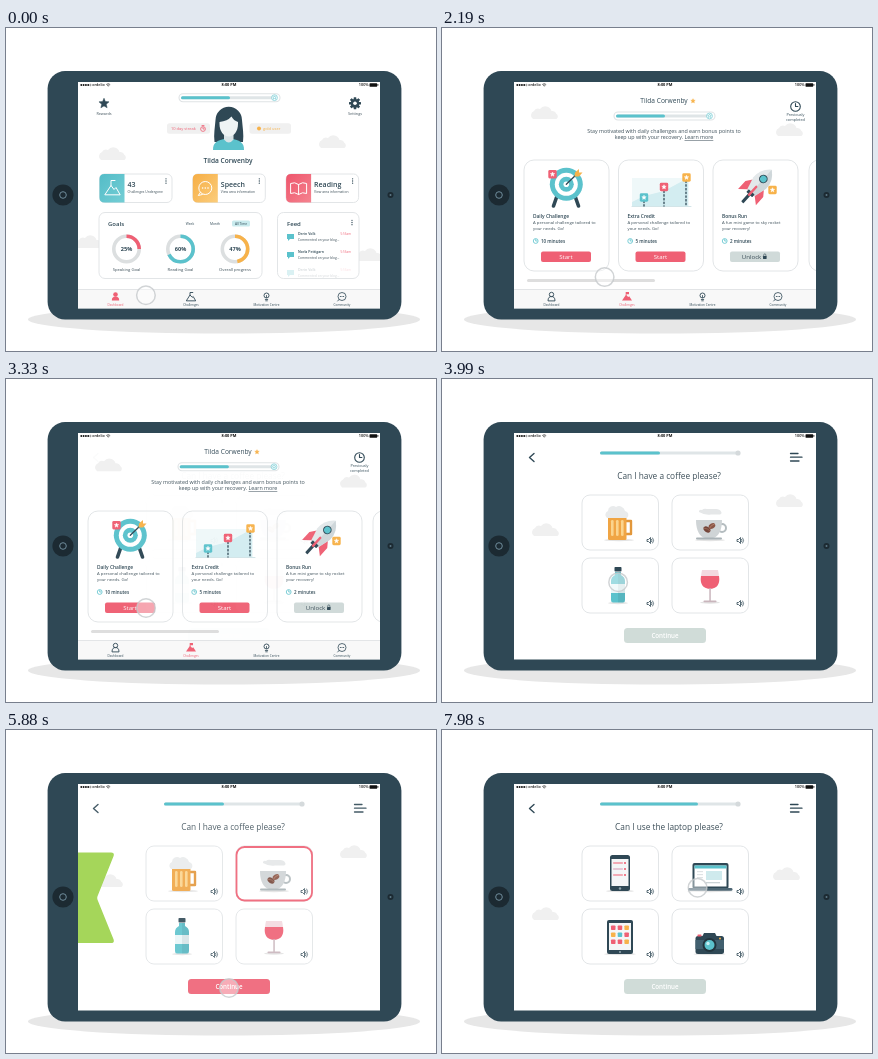
Write an HTML page that moves like this. It is 430x323 px and loops after 8000 ms.

```html
<!DOCTYPE html>
<html lang="en">
<head>
<meta charset="utf-8">
<title>Speech recovery app</title>
<style>
html, body { margin: 0; width: 100%; height: 100%; overflow: hidden; background: #fff; }
svg { display: block; width: 100vw; height: 100vh; }
text { font-family: "Open Sans", "Noto Sans", sans-serif; }
</style>
</head>
<body>
<svg id="stage" viewBox="0 0 430 323"></svg>
<script>
const NAVY = '#2f4855', TEAL = '#5bc2cc', RED = '#ef6074', GOLD = '#f7b24a',
      GREY = '#dfe3e5', PALE = '#f0f0f0', TEXT = '#3d4f59';
const LOOP = 8000;

// ---- shape helpers ----
const rect = (x, y, w, h, r, fill, more = '') =>
  `<rect x="${x}" y="${y}" width="${w}" height="${h}" rx="${r}" fill="${fill}" ${more}/>`;
const circle = (x, y, r, fill, more = '') =>
  `<circle cx="${x}" cy="${y}" r="${r}" fill="${fill}" ${more}/>`;
const oval = (x, y, rx, ry, fill) => `<ellipse cx="${x}" cy="${y}" rx="${rx}" ry="${ry}" fill="${fill}"/>`;
const path = (d, fill, more = '') => `<path d="${d}" fill="${fill}" ${more}/>`;
const line = (d, color, w = 1, more = '') =>
  path(d, 'none', `stroke="${color}" stroke-width="${w}" stroke-linecap="round" stroke-linejoin="round" ${more}`);
const ring = (x, y, r, color, w = 1) => circle(x, y, r, 'none', `stroke="${color}" stroke-width="${w}"`);
const group = (id, body, more = '') => `<g id="${id}" ${more}>${body}</g>`;
const at = (x, y, body, more = '') => `<g transform="translate(${x} ${y}) ${more}">${body}</g>`;
const gradient = (id, from, to) =>
  `<linearGradient id="${id}" x2="1" y2="1"><stop stop-color="${from}"/><stop offset="1" stop-color="${to}"/></linearGradient>`;

// Text is placed by its visual middle.
const text = (x, y, size, str, { fill = TEXT, weight = 400, anchor = 'start' } = {}) =>
  `<text x="${x}" y="${y + size * 0.35}" font-size="${size}" fill="${fill}" font-weight="${weight}" text-anchor="${anchor}">${str}</text>`;
const mid = (x, y, size, str, fill = TEXT, weight = 400) => text(x, y, size, str, { fill, weight, anchor: 'middle' });

const starPath = (x, y, r) => 'M' + Array.from({ length: 10 }, (_, i) => {
  const a = i * Math.PI / 5, q = i % 2 ? r * 0.45 : r;
  return `${(x + q * Math.sin(a)).toFixed(2)} ${(y - q * Math.cos(a)).toFixed(2)}`;
}).join('L') + 'Z';
const star = (x, y, r, fill) => path(starPath(x, y, r), fill, `stroke="${fill}" stroke-width=".5" stroke-linejoin="round"`);
const panel = (x, y, w, h, r) => rect(x, y, w, h, r, '#fff', `stroke="${GREY}" stroke-width=".9"`);
const badge = (x, y, color) => rect(x - 4.2, y - 4.2, 8.4, 8.4, 1.4, color) + star(x, y, 2.3, '#fff');
const clock = (x, y, r, color, w) => ring(x, y, r, color, w) + line(`M${x} ${y - r * .6}V${y}H${x + r * .5}`, color, w);
const dots = (x, y) => [-2.2, 0, 2.2].map(d => circle(x, y + d, .65, NAVY)).join('');
const bubble = (x, y, color) => path(`M${x - 3.5} ${y - 3}h7v5h-4l-2 2v-2h-1z`, color);
const cloudShape = path('M-13 6a4.5 4.5 0 0 1 1-8a5 5 0 0 1 6-2a6.5 6.5 0 0 1 11.5 2a5 5 0 0 1 5 3a3 3 0 0 1 0 5z', PALE);

// ---- tablet ----
const device =
  oval(218, 291.5, 196, 14, '#e7e7e7') +
  rect(41.6, 43.1, 353.8, 248.4, 17.5, NAVY) +
  circle(57, 167, 10.6, '#1c2a32') + ring(57, 167, 3.3, '#6f8c9b', 1) +
  circle(384.5, 167, 3, '#1c2a32') + circle(384.5, 167, 1, '#5d7886') +
  rect(72, 54, 302, 226.5, 0, '#fff');

const status =
  [0, 1, 2, 3].map(i => circle(75.3 + i * 2.3, 57, .95, '#111')).join('') + ring(84.4, 57, .75, '#111', .4) +
  text(86.3, 57, 3.7, 'ordelio', { fill: '#111', weight: 600 }) +
  line('M100.5 56.3q1.7-1.5 3.4 0M101.3 57.3q.9-.8 1.8 0', '#111', .6) + circle(102.2, 58.1, .4, '#111') +
  mid(223, 57, 3.9, '8:00 PM', '#111', 700) +
  text(362.6, 57, 3.8, '100%', { fill: '#111', weight: 600, anchor: 'end' }) +
  rect(363.5, 55.3, 7.7, 3.4, .6, '#111') + rect(371.5, 56.3, .8, 1.4, .2, '#111');

// ---- tab bar ----
const icons = [
  c => circle(0, -2, 2.3, c) + path('M-3.7 4c0-3 1.5-4 3.7-4s3.7 1 3.7 4z', c),
  c => path('M-5 4L-1-1.8L1.2 .5L2.2-.3L5 4z', c) + path('M-1.3-4.5H2V-2.3H-.5V-1h-.8z', c),
  c => ring(0, -1, 2.5, c, .9) + line('M-1.2 3h2.4M-.8 4.3h1.6M0 1v-2', c, .8),
  c => ring(0, 0, 4, c, .8) + line('M-3 3l-1.3 1.5', c, .8) + [-1.6, 0, 1.6].map(x => circle(x, 0, .6, c)).join('')
];
const outlines = [
  c => ring(0, -2, 2.2, c, .9) + line('M-3.5 4c0-3 1.5-4 3.5-4s3.5 1 3.5 4z', c, .9),
  c => line('M-4.5 4L-1-1.5L1.2 .8L2.2 0L4.5 4zM-1-1.5V-4H1.8', c, .9),
  icons[2], icons[3]
];
const tabs = ['Dashboard', 'Challenges', 'Motivation Centre', 'Community'];
const tabItem = (i, on) => {
  const x = 109.5 + i * 75.5, c = on ? RED : NAVY;
  return at(x, 268.5, (on ? icons : outlines)[i](c)) + mid(x, 276.6, 3.1, tabs[i], c);
};
const tabBar = active => rect(72, 261.5, 302, 19, 0, '#f8f8f8') + line('M72 261.5H374', '#dcdfe1', .8) +
  tabs.map((_, i) => tabItem(i, i === active)).join('');

// ---- dashboard ----
const gear = at(349, 75.3, Array.from({ length: 8 }, (_, i) =>
  rect(-1.3, -6, 2.6, 4, .5, NAVY, `transform="rotate(${i * 45})"`)).join('') + circle(0, 0, 4.4, NAVY) + circle(0, 0, 1.8, '#fff'));
const avatar =
  path('M208.5 114C207.5 106 209 99 209.500 92a13.200 13.200 0 0 1 26.500 0c.5 7 2 14 1 22z', NAVY) +
  path('M207 122c0-7 3-9 11-11h9c8 2 11 4 11 11z', TEAL) +
  path('M218 104h9.5v7.500q-4.700 6-9.500 0z', '#d9e3e6') +
  path('M213.5 94q8-1 12-5.500q2 4 6.500 5.500v2c0 7-4 12.500-9.200 12.500s-9.300-5.500-9.300-12.500z', '#eef3f4');
const tileArt = [
  line('M-7 6L-1-3L2 1L4-1L8 6zM-1-3V-8H3', '#fff', 1),
  circle(0, -.5, 6.5, 'none', 'stroke="#fff" stroke-width="1"') + line('M-5 4l-2 3l4-1', '#fff', 1) +
    [-2.7, 0, 2.7].map(x => circle(x, -.5, .8, '#fff')).join(''),
  line('M0-4q-4-3-8-1V5q4-2 8 1q4-3 8-1V-5q-4-2-8 1V6', '#fff', 1)
];
const tile = (i, tint, title, sub) => {
  const x = 93.5 + i * 93.3;
  return panel(x, 146, 72.5, 28.5, 5) +
    path(`M${x + 25} 146h-20q-5 0-5 5v18.5q0 5 5 5h20z`, `url(#${tint})`) +
    at(x + 12.5, 160.5, tileArt[i]) +
    text(x + 28, 156.5, 7, title, { fill: NAVY, weight: 600 }) +
    text(x + 28, 164, 3.35, sub) + dots(x + 66.5, 153);
};
const donut = (x, pct, arc, color, label) =>
  ring(x, 221, 12.7, '#dcdfe0', 3.6) +
  `<circle cx="${x}" cy="221" r="12.7" fill="none" stroke="${color}" stroke-width="3.6" pathLength="100" stroke-dasharray="${arc} 100" transform="rotate(-90 ${x} 221)"/>` +
  mid(x, 221.5, 5.6, pct + '%', NAVY, 700) + mid(x, 242, 4.2, label);
const post = (y, who, when) => bubble(284.5, y + 2, TEAL) +
  text(292, y - 1.5, 3.5, who, { fill: NAVY, weight: 600 }) +
  text(345, y - 1.5, 3, when, { fill: RED, anchor: 'end' }) + text(292, y + 5, 3.25, 'Commented on your blog...');

const home =
  at(328, 114, cloudShape) + at(85, 214, cloudShape) +
  star(98, 75.5, 5.3, NAVY) + mid(98, 86, 3.8, 'Rewards') + gear + mid(349, 86, 3.8, 'Settings') +
  avatar +
  rect(161, 95.2, 43, 10.5, 2.5, PALE) + text(165, 100.5, 4, '10 day streak', { fill: RED }) +
  clock(197, 101, 2.4, RED, .8) + line('M196 97.5h2', RED, .8) +
  rect(243.5, 95.2, 41.5, 10.5, 2.5, PALE) + circle(253, 100.5, 2, GOLD) + text(257, 100.5, 4, 'gold user', { fill: GOLD }) +
  tile(0, 'tealTint', '43', 'Challenges Undergone') +
  tile(1, 'goldTint', 'Speech', 'View area information') +
  tile(2, 'redTint', 'Reading', 'View area information') +
  panel(93, 184.5, 163, 66, 6) + text(102, 195.5, 6, 'Goals', { fill: NAVY, weight: 600 }) +
  mid(184, 195.5, 3.3, 'Week', NAVY) + mid(209, 195.5, 3.3, 'Month', NAVY) +
  rect(226, 192.5, 18, 6, 1.5, '#c9ebee') + mid(235, 195.5, 3.3, 'All Time', NAVY) +
  donut(120.5, 25, 25, RED, 'Speaking Goal') + donut(174.5, 60, 68, TEAL, 'Reading Goal') +
  donut(229, 47, 47, GOLD, 'Overall progress') +
  panel(271.5, 184.5, 81.5, 66, 6) + text(281, 195.5, 6, 'Feed', { fill: NAVY, weight: 600 }) + dots(346, 194.5) +
  post(207, 'Derin Volk', '5:56am') + post(225, 'Norla Pettigarn', '5:56am') +
  `<g opacity=".22">${post(243, 'Derin Volk', '5:56am')}</g>` +
  tabBar(0);

// ---- challenges ----
const target =
  line('M115 168l-3.500 10M133 168l3.500 10', NAVY, 3.6) +
  [[16.5, TEAL], [11.5, '#fff'], [7.5, TEAL], [2.8, '#fff']].map(([r, c]) => circle(124.3, 156.3, r, c)).join('') +
  line('M124.300 156.300L135 146', NAVY, 1.3) + path('M132.500 148.500l.5-4 4-3.500v3.500h3.500l-3.500 4z', GOLD) + badge(110.5, 146.3, RED);
const chart =
  rect(190, 150, 57, 28, 0, '#eff8f9') +
  path('M190 178V174L202 168L222 163L246 150V178z', '#d3edf1') +
  line('M190 178.5H249', '#c8dfe3', .8) +
  line('M202 173V178M222 163V178M244 153V178', NAVY, 1.3, 'stroke-dasharray="1.5 2.2"') +
  badge(202, 169.5, TEAL) + badge(222, 159, RED) + badge(244.5, 149.5, GOLD);
const rocket = at(315, 158,
  rect(-1.6, 6, 3.2, 16, .8, NAVY) +
  path('M-6-4l-6 8v11l7-6h10l7 6V4l-6-8z', RED) +
  path('M0-22q9 7 8.500 18l-3.500 13h-10l-3.500-13q-.5-11 8.500-18z', '#e3e8ea') +
  path('M0-22q9 7 8.500 18l-3.500 13h-5z', '#cfd7da') +
  circle(0, -9.5, 4.3, NAVY) + circle(0, -9.5, 3.3, TEAL) +
  rect(-4, 8, 8, 3.5, .5, NAVY) + rect(-1.2, 0, 2.4, 13, 1, RED), 'rotate(42)') + badge(330.5, 162, GOLD);
const lock = rect(321, 228, 3.6, 2.9, .4, NAVY) + line('M321.700 228v-1a1.100 1.100 0 0 1 2.200 0v1', NAVY, .6);
const challenge = (i, art, title, a, b, mins, open) => {
  const x = 82 + i * 94.5;
  return panel(x, 132, 85, 111, 10) + art +
    text(x + 9, 188, 4.85, title, { fill: NAVY, weight: 600 }) + text(x + 9, 194.7, 4.25, a) + text(x + 9, 201, 4.25, b) +
    clock(x + 11.7, 213, 2.4, TEAL, .8) + text(x + 17, 213, 4.5, mins + ' minutes', { fill: NAVY, weight: 600 }) +
    rect(x + 17, 223.5, 50, 10.5, 2, open ? RED : '#d0dad9') +
    mid(x + (open ? 42 : 38.5), 228.5, 6.1, open ? 'Start' : 'Unlock', open ? '#fff' : TEXT);
};
const challenges =
  star(251, 73, 2.3, GOLD) +
  clock(353.5, 78.5, 4.8, NAVY, 1.1) + mid(353.5, 87, 3.8, 'Previously', NAVY) + mid(353.5, 92, 3.8, 'completed', NAVY) +
  mid(222, 103, 5.33, 'Stay motivated with daily challenges and earn bonus points to') +
  mid(222, 109.6, 5.33, 'keep up with your recovery. <tspan text-decoration="underline">Learn more</tspan>') +
  challenge(0, target, 'Daily Challenge', 'A personal challenge tailored to', 'your needs. Go!', 10, true) +
  challenge(1, chart, 'Extra Credit', 'A personal challenge tailored to', 'your needs. Go!', 5, true) +
  challenge(2, rocket, 'Bonus Run', 'A fun mini game to sky rocket', 'your recovery!', 2, false) + lock +
  panel(367, 132, 85, 111, 10) +
  rect(85, 251, 128, 3, 1.5, '#dedede') + tabBar(1);

// ---- quiz ----
const speaker = (x, y) => path(`M${x - 3} ${y - 1}h1.5l2-2v6l-2-2h-1.5z`, 'none', `stroke="${NAVY}" stroke-width=".8"`) +
  line(`M${x + 1.5} ${y - 1.2}q1 1.2 0 2.4M${x + 2.7} ${y - 2.5}q2 2.5 0 5`, NAVY, .7);
const cell = (i, art) => {
  const x = 140 + i % 2 * 90, y = 116 + (i > 1 ? 63 : 0);
  return panel(x, y, 76.5, 55, 8) + art + speaker(x + 68, y + 45.5);
};
const ground = (x, y, w) => oval(x, y, w, 1.2, '#e3e3e3');
const beer = ground(177, 161, 15) +
  line('M184 142h5v13h-5', '#e2973b', 2.4) + rect(166, 136, 18.5, 25, 1.5, '#f0a544') +
  [169, 174, 179].map(x => rect(x, 141, 2.6, 16, 1.2, '#fbd48d')).join('') +
  path('M165 139a4 4 0 0 1 1-7a5 5 0 0 1 8-4a6 6 0 0 1 9 4a4 4 0 0 1 2 7z', '#e9ebec');
const coffee = ground(268, 161, 15) +
  path('M257 133a2 2 0 0 1 3-2q2-2 5-1h9q4 0 5 2.5a2 2 0 0 1-1 3h-9q-6 1-12-2.5z', '#e5e7e8') +
  ring(280, 149, 4, '#b4bcbf', 2) + path('M254 141h26c0 11-4 17-9 18h-8c-5-1-9-7-9-18z', '#cfd4d6') +
  rect(254, 158.5, 26, 2, 1, '#aab3b7') +
  at(265, 150.5, oval(0, 0, 3.8, 2.6, '#74463a') + line('M-3 .5q3-2 6-1', '#b07b66', .6), 'rotate(35)') +
  at(270, 147, oval(0, 0, 3.5, 2.5, '#8a5546') + line('M-3 .5q3-2 6-1', '#c28f79', .6), 'rotate(-30)');
const bottle = ground(176, 224, 10) +
  rect(172.5, 188, 7, 4.5, .8, NAVY) +
  path('M173 193h6v3q4 2 4 6v19q0 2.5-2 2.5h-10q-2 0-2-2.5v-19q0-4 4-6z', TEAL) +
  rect(169, 205, 14, 9, 0, '#e8f6f8') + path('M176 193h3v3q4 2 4 6v19q0 2.5-2 2.5h-5z', NAVY, 'opacity=".1"');
const wine = ground(268, 223.5, 10) +
  path('M260 191h16q4 18-8 19q-12-1-8-19z', '#f3d9df') + path('M259 197h18q2 12-9 13q-11-1-9-13z', RED) +
  rect(267.3, 209, 1.5, 13, 0, '#c9b5bc') + rect(261.5, 221.5, 13, 1.7, .8, '#c9b5bc');

const phone = ground(178, 161, 14) + rect(168, 125, 20, 36, 2.5, NAVY) + rect(169.5, 129, 17, 27, 0, '#f4f6f7') +
  [132, 138, 144].map((y, i) => rect(171, y, 10, 2, .8, i == 1 ? '#e6c7d6' : '#f3aab5') + circle(183, y + 1, 1.1, RED)).join('') +
  circle(178, 158.5, 1.2, '#8fa3ad');
const laptop = ground(268, 161, 23) + rect(250.5, 133, 36, 26, 2, NAVY) + rect(252.5, 135.5, 32, 21, 0, '#fff') +
  rect(252.5, 135.5, 32, 3, 0, TEAL) + rect(264, 141, 16, 9, 0, '#cfeaed') +
  [141, 144, 147].map(y => rect(255, y, 6, 1.2, 0, GREY)).join('') + rect(264, 152, 14, 1.3, 0, '#cbd3d6') +
  rect(246, 158, 44.5, 2.8, 1.4, '#4d6673');
const slate = ground(178, 224, 16) + rect(165, 190, 26, 34, 2, NAVY) + rect(167, 193, 22, 27, 0, '#f4f6f7') +
  Array.from({ length: 9 }, (_, i) => rect(169 + i % 3 * 6.7, 195.5 + (i / 3 | 0) * 7, 4.5, 4.5, .8, [RED, TEAL, GOLD, RED][(i * 3 + (i / 3 | 0)) % 4])).join('') +
  circle(178, 222, 1, '#8fa3ad');
const camera = ground(267.5, 224, 16) + path('M260 207l2-4h11l2 4z', NAVY) + rect(253.5, 206, 28.5, 18, 2.5, NAVY) +
  rect(253.5, 210, 28.5, 9, 0, '#41606f') + rect(255.5, 204.5, 4, 2, .5, RED) +
  circle(267.5, 215, 7, '#22343d') + circle(267.5, 215, 5, TEAL) + circle(266, 213.5, 1.7, '#c5eef2') + circle(278, 208.5, 1, GOLD);

const quiz = (id, question, arts) => group(id, mid(227, 96.7, 8.3, question) + arts.map((a, i) => cell(i, a)).join(''));
const nav = line('M92 74.5L87.5 78.5L92 82.5', NAVY, 1.4) + line('M348.5 74.5H356M348.5 78.2H360M348.5 82H357', NAVY, 1.3);

const banner = group('banner',
  path('M72 122.5H212.5Q216 122.5 215 126L199 166Q198.2 168 199 170L215 209.5Q216 213 212.5 213H72z', '#a5d65a') +
  mid(135, 145, 10.2, 'You are correct :)', '#fff', 700) + mid(131.7, 165, 9.5, 'Well done!', '#fff') +
  rect(93, 182.5, 76.5, 16.5, 3.5, '#7ead3b', 'opacity=".5"') + rect(93, 181.5, 76.5, 16.5, 3.5, '#fff') +
  mid(131, 189.7, 7.4, 'Continue', NAVY, 600));

const stage = document.getElementById('stage');
stage.innerHTML = `<clipPath id="screen"><rect x="72" y="54" width="302" height="226.5"/></clipPath>` +
  gradient('tealTint', '#53bcc7', '#74ced5') + gradient('goldTint', '#f6ae45', '#fbcd7c') + gradient('redTint', '#ee556c', '#f5838f') +
  device +
  `<g clip-path="url(#screen)">` + group('cloudA', cloudShape) + group('cloudB', cloudShape) +
  group('home', home) + group('challenges', challenges) +
  group('quiz', nav +
    quiz('first', 'Can I have a coffee please?', [beer, coffee, bottle, wine]) +
    quiz('second', 'Can I use the laptop please?', [phone, laptop, slate, camera]) +
    rect(230.5, 117, 75.5, 53.5, 8, 'none', `id="picked" stroke="${RED}" stroke-width="1.8"`) +
    rect(182, 249, 82, 15, 3.5, '#d0dcd8') + rect(182, 249, 82, 15, 3.5, RED, 'id="ready"') +
    mid(223, 256.5, 6.2, 'Continue', '#fff', 600)) +
  group('user', mid(0, 0, 6.6, 'Tilda Corwenby', NAVY, 'inherit')) +
  group('pill', rect(0, -4, 101, 8, 4, '#fff', `stroke="${GREY}" stroke-width="1.1"`)) +
  rect(0, 0, 0, 3, 1.5, '#dfe5e7', 'id="track"') + rect(0, 0, 0, 3, 1.5, TEAL, 'id="fill"') +
  group('goal', circle(0, 0, 2.9, '#fff', `stroke="${TEAL}" stroke-width=".6"`) + path(starPath(0, 0, 1.9), 'none', `stroke="${TEAL}" stroke-width=".5"`)) +
  circle(0, 0, 2.6, '#d5dadc', 'id="knob"') +
  banner + status +
  group('cursor', circle(0, 0, 9.3, '#fff', 'fill-opacity=".42" stroke="#c6cacc" stroke-opacity=".8" stroke-width="1.5"')) + '</g>';

// ---- motion ----
const el = {};
stage.querySelectorAll('[id]').forEach(n => el[n.id] = n);
const set = (id, attrs) => { for (const k in attrs) el[id].setAttribute(k, attrs[k]); };
const move = (id, x, y, s = 1) => set(id, { transform: `translate(${x} ${y}) scale(${s})` });
const fade = (id, o) => set(id, { opacity: o, visibility: o > 0 ? 'visible' : 'hidden' });
const ramp = (t, a, b) => {
  const u = Math.min(1, Math.max(0, (t - a) / (b - a)));
  return (1 - Math.cos(Math.PI * u)) / 2;
};
const mix = (a, b, u) => a + (b - a) * u;

// Each cursor trip: start, end, x, y.
const trips = [[-150, 300, 184, 268], [1700, 2700, 140, 229], [3750, 4420, 266, 139],
  [4840, 5340, 223, 258], [6150, 6650, 155, 196], [7620, 8080, 268, 153]];
const clicks = [400, 3140, 4640, 5560, 6900];

function draw(t) {
  const a = ramp(t, 450, 950), b = ramp(t, 3300, 3650), c = ramp(t, 6980, 7310);
  const steps = (v0, v1, v2, v3 = v2) => mix(mix(mix(v0, v1, a), v2, b), v3, c);

  fade('home', 1 - a);
  fade('challenges', a * (1 - b));
  fade('quiz', b);
  fade('first', 1 - c);
  fade('second', c);
  move('user', 222, steps(132.5, 73, 73));
  set('user', { 'font-weight': a < .5 ? 600 : 400 });
  fade('user', 1 - b);

  const x = steps(175, 174, 158), y = steps(69.7, 88, 74), end = steps(268.5, 267.5, 296);
  move('pill', steps(173, 172, 172), y);
  fade('pill', 1 - b);
  set('track', { x, y: y - 1.5, width: end - x });
  set('fill', { x, y: y - 1.5, width: steps(224, 223, 218, 256) - x });
  move('goal', end, y);
  fade('goal', 1 - b);
  move('knob', end, y);
  fade('knob', b);

  move('cloudA', steps(108, 104, 105, 105), steps(126, 85, 151, 184));
  move('cloudB', steps(365, 349, 349, 346), steps(227, 102, 122, 144));

  const picked = ramp(t, 4660, 4800) * (1 - c);
  fade('picked', picked);
  fade('ready', picked);

  const shown = ramp(t, 5740, 6150) * (1 - c);
  move('banner', -146 * (1 - shown), 0);
  fade('banner', shown > 0 ? 1 : 0);
  el.quiz.style.filter = shown > 0 ? `blur(${(1.6 * shown).toFixed(2)}px)` : 'none';
  if (shown > 0) fade('quiz', 1 - .4 * shown);

  let cx = 125, cy = 267;
  for (const [from, to, tx, ty] of trips) {
    const u = ramp(t, from, to);
    cx = mix(cx, tx, u);
    cy = mix(cy, ty, u);
  }
  const press = Math.max(...clicks.map(k => 1 - Math.min(1, Math.abs(t - k) / 110)));
  move('cursor', cx, cy, 1 - .18 * press);
}

const start = performance.now();
(function frame() {
  draw((performance.now() - start) % LOOP);
  requestAnimationFrame(frame);
})();
</script>
</body>
</html>
```
